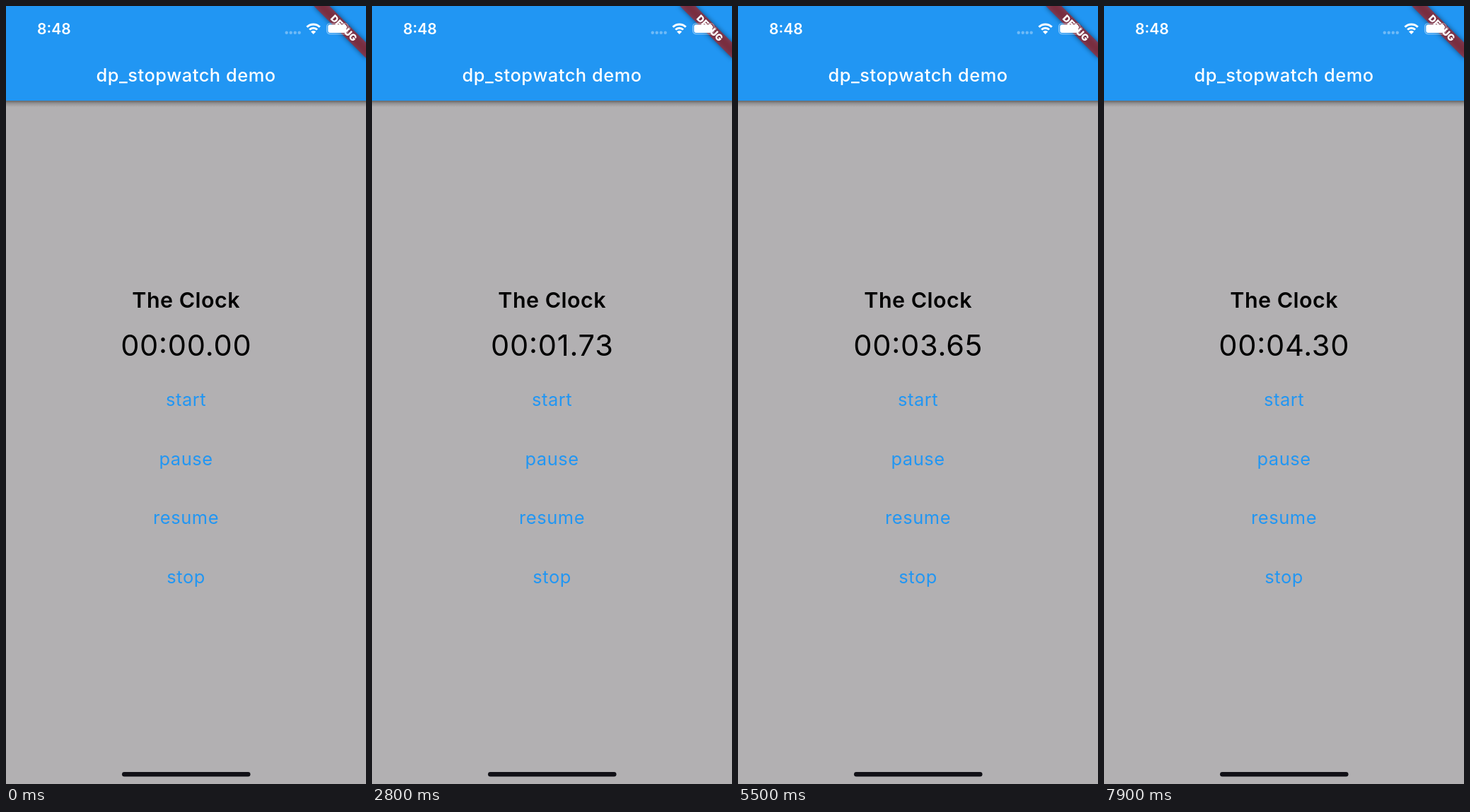
These frames come from a looping animation (509 px wide and 1101 px high, 8 s). An HTML page:

```html
<!DOCTYPE html>
<html lang="en">
<head>
<meta charset="utf-8">
<title>Stopwatch demo</title>
<style>
  html, body { margin: 0; width: 100%; height: 100%; overflow: hidden; background: #b2b0b2; }
  svg { display: block; width: 100vw; height: 100vh; }
  text { font-family: Inter, Roboto, sans-serif; font-feature-settings: "calt" 1, "case" 1; text-anchor: middle; }
  .title { font-size: 25.4px; font-weight: 500; letter-spacing: .55px; fill: #fff; }
  .heading { font-size: 30.4px; font-weight: 600; letter-spacing: .5px; }
  .clock { font-size: 41.5px; letter-spacing: .8px; }
  .button { font-size: 25.4px; letter-spacing: .6px; fill: #2196f3; }
  .status { font-size: 21px; font-weight: 600; fill: #fff; }
  .debug { font-size: 13.3px; font-weight: 900; fill: #fff; }
</style>
</head>
<body>
<svg viewBox="0 0 509 1101">
  <defs>
    <linearGradient id="shade" x2="0" y2="1">
      <stop offset="0" stop-color="#000" stop-opacity=".42"/>
      <stop offset=".45" stop-color="#000" stop-opacity=".16"/>
      <stop offset="1" stop-color="#000" stop-opacity="0"/>
    </linearGradient>
    <filter id="blur" x="-20%" y="-80%" width="140%" height="260%">
      <feGaussianBlur stdDeviation="3.5"/>
    </filter>
  </defs>

  <rect width="509" height="1101" fill="#b2b0b2"/>
  <rect y="134" width="509" height="9" fill="url(#shade)"/>
  <rect width="509" height="134" fill="#2196f3"/>
  <text class="title" x="254.6" y="106.5">dp_stopwatch demo</text>

  <text class="heading" x="254.7" y="427">The Clock</text>
  <text class="clock" id="clock" x="254.8" y="495">00:00.00</text>
  <g id="buttons"></g>

  <g transform="translate(509 0) rotate(45)">
    <rect x="-52.2" y="36.5" width="104.4" height="15.7" opacity=".5" filter="url(#blur)"/>
    <rect x="-52.2" y="36.5" width="104.4" height="15.7" fill="#b71c1c" fill-opacity=".627"/>
    <text class="debug" y="49.1">DEBUG</text>
  </g>

  <text class="status" x="67.8" y="40">8:48</text>
  <g id="dots" fill="#fff" opacity=".35"></g>
  <g id="wifi" fill="none" stroke="#fff" stroke-width="2.9"></g>
  <rect x="453.6" y="24.6" width="30" height="15" rx="4.5" fill="none" stroke="#fff" stroke-width="1.3" opacity=".45"/>
  <rect x="455.3" y="26.3" width="26" height="11.6" rx="3" fill="#fff"/>
  <path d="M485 29.5q2 .7 2 2.6t-2 2.6z" fill="#fff" opacity=".45"/>

  <rect x="164" y="1084" width="181.5" height="6.5" rx="3.25" fill="#111016"/>
</svg>
<script>
  const LOOP = 8000, STEP = 100;
  // Spans in which the stopwatch runs, in ms of the loop.
  const runs = [[1070, 3470], [4250, 5760], [7510, LOOP]];
  const byId = id => document.getElementById(id);

  function add(parent, tag, attrs, text = "") {
    const el = document.createElementNS("http://www.w3.org/2000/svg", tag);
    for (const name in attrs) el.setAttribute(name, attrs[name]);
    el.textContent = text;
    byId(parent).append(el);
  }

  ["start", "pause", "resume", "stop"].forEach((label, i) =>
    add("buttons", "text", { class: "button", x: 254.6, y: 566 + 83.5 * i }, label));

  for (let i = 0; i < 4; i++) add("dots", "circle", { cx: 396.7 + 6 * i, cy: 37.8, r: 2.2 });

  for (const r of [2.2, 7.7, 13]) {
    const d = r * Math.SQRT1_2;
    add("wifi", "path", { d: `M${434.6 - d} ${39 - d}A${r} ${r} 0 0 1 ${434.6 + d} ${39 - d}` });
  }
  add("wifi", "path", { d: "M434.6 40L431 36.2Q434.6 33.2 438.2 36.2Z", fill: "#fff", stroke: "none" });

  const pad = n => String(n).padStart(2, "0");

  function elapsed(t) {
    return runs.reduce((sum, [from, to]) => sum + Math.max(0, Math.min(t, to) - from), 0);
  }

  function draw(t) {
    const cs = Math.floor(elapsed(Math.floor(t / STEP) * STEP) / 10);
    const text = `${pad(Math.floor(cs / 6000))}:${pad(Math.floor(cs / 100) % 60)}.${pad(cs % 100)}`;
    const clock = byId("clock");
    if (clock.textContent !== text) clock.textContent = text;
  }

  const began = performance.now();
  function frame() {
    draw((performance.now() - began) % LOOP);
    requestAnimationFrame(frame);
  }
  frame();
</script>
</body>
</html>
```
